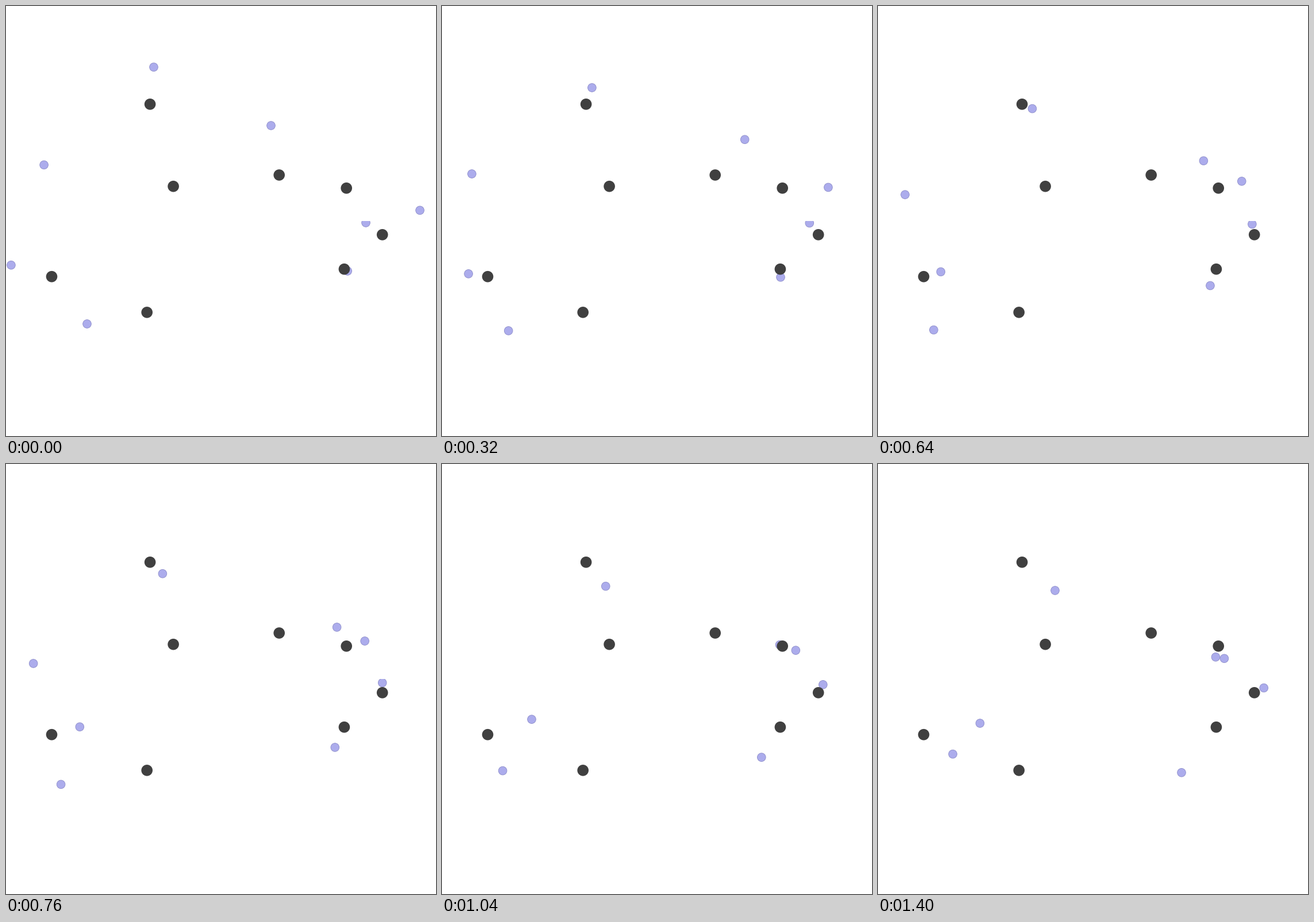
Write a matplotlib script that moves like this. It is 748 px wide and 748 px high and loops after 1440 ms.

```python
import numpy as np
import matplotlib.pyplot as plt
from matplotlib.animation import FuncAnimation
from matplotlib.patches import Circle, Rectangle

SIZE, DPI = 748, 100
FRAMES, INTERVAL = 36, 40
HALF = SIZE / 2

ANCHORS = [(250.6, 170.8), (291.1, 313.7), (475.2, 294), (592.2, 316.8),
           (654.7, 397.8), (588.4, 457.7), (79.5, 470.7), (245.2, 532.9)]

# A few points per drifting dot, evenly spaced in time.
WAYPOINTS = [
    [(257, 106.3), (263.8, 159.2), (279.5, 205.6), (308, 220)],
    [(461, 208), (547.8, 248.4), (584.4, 303.8), (587.4, 335.8)],
    [(66.1, 276.4), (47.2, 337.2), (73, 496)],
    [(720, 355.4), (667.4, 313.2), (628, 306), (615.2, 324.8), (602.4, 338.3)],
    [(8.9, 450.7), (52, 466.3), (119.3, 460), (156.6, 443.8), (177.4, 451)],
    [(141, 553), (113.2, 565.6), (95.8, 560.8), (106.2, 532.6), (130.1, 504.6)],
    [(626, 377), (652.8, 380), (671.2, 389.5)],
    [(594.2, 461), (575.2, 489.6), (528, 536.8)],
]


def smooth_path(points):
    """Polynomial motion through the points, sampled once per step."""
    knots = np.linspace(0, 1, len(points))
    coeffs = np.polyfit(knots, points, len(points) - 1)
    t = np.linspace(0, 1, FRAMES)
    return np.column_stack([np.polyval(c, t) for c in coeffs.T])


fig = plt.figure(figsize=(SIZE / DPI, SIZE / DPI), dpi=DPI, facecolor="white")
ax = fig.add_axes([0, 0, 1, 1])
ax.set(xlim=(0, SIZE), ylim=(SIZE, 0))
ax.axis("off")

paths = [smooth_path(points) for points in WAYPOINTS]
dots = []
for path in paths:
    dot = Circle(path[0], 7.3, fc="#acacec", ec="#9090cc", lw=0.65, zorder=1)
    ax.add_patch(dot)
    # Each dot shows only in the half of the stage where it starts.
    top = HALF if path[0, 1] > HALF else 0
    dot.set_clip_path(Rectangle((0, top), SIZE, HALF, transform=ax.transData))
    dots.append(dot)

for xy in ANCHORS:
    ax.add_patch(Circle(xy, 9.8, fc="#404040", ec="none", zorder=2))


def update(step):
    for dot, path in zip(dots, paths):
        dot.center = path[step]
    return dots


anim = FuncAnimation(fig, update, frames=FRAMES, interval=INTERVAL,
                     repeat=True, repeat_delay=0)
plt.show()
```
